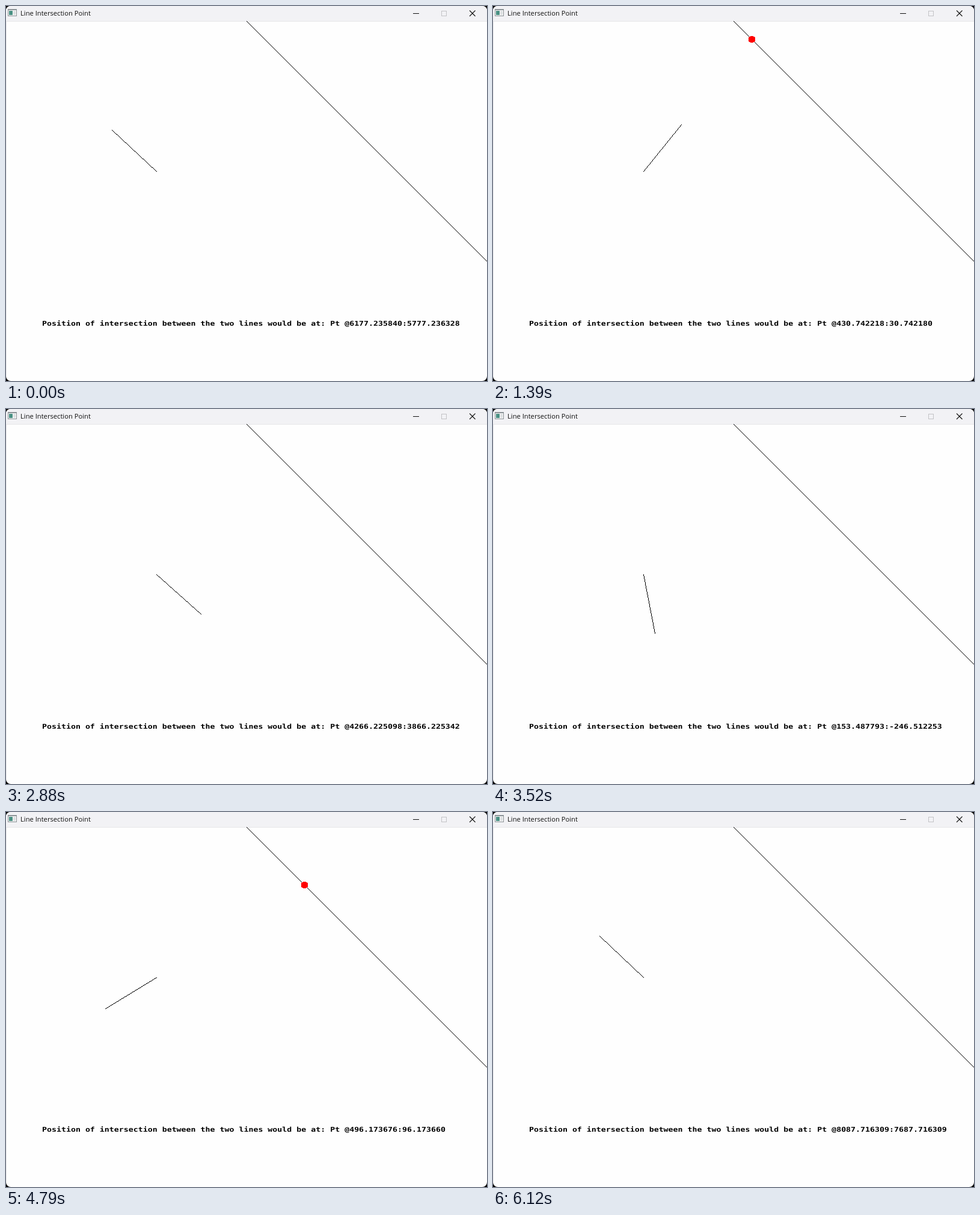
These frames come from a looping animation (800x624 px, 6.21 s). An HTML page with a canvas:

```html
<!DOCTYPE html>
<html lang="en">
<head>
<meta charset="utf-8">
<title>Line Intersection Point</title>
<style>
  html, body { margin: 0; width: 100%; height: 100%; overflow: hidden; background: #000; }
  svg, canvas { position: absolute; left: 0; top: 0; width: 800px; height: 624px; }
  .title { font: 11.2px "Open Sans", "Noto Sans", sans-serif; fill: #111; }
  .report { font: bold 13.288px "DejaVu Sans Mono", "Liberation Mono", monospace; text-rendering: geometricPrecision; }
</style>
</head>
<body>
<svg viewBox="0 0 800 624">
  <rect width="800" height="624" rx="8" fill="#fefefe"/>
  <path d="M0 25V8Q0 0 8 0H792Q800 0 800 8V25Z" fill="#f2f2f5"/>
  <path d="M0 25.5H800M.5 25V616" stroke="#e6e6e9" fill="none"/>
  <g shape-rendering="crispEdges">
    <rect x="3" y="5" width="15" height="12" fill="#8b9296"/>
    <rect x="4" y="7" width="13" height="9" fill="#f8f8f8"/>
    <rect x="5" y="8" width="6" height="7" fill="#4a9184"/>
    <rect x="12" y="8" width="4" height="7" fill="#dde1e2"/>
  </g>
  <text class="title" x="24" y="16">Line Intersection Point</text>
  <path d="M677 12.5H687" stroke="#111"/>
  <rect x="724.5" y="8.5" width="8" height="8" fill="none" stroke="#c3c3c6"/>
  <path d="M771 7.5L780.5 17M780.5 7.5L771 17" stroke="#111" stroke-width="1.1"/>
  <text class="report" id="report" transform="translate(60 532) scale(1 .83)"></text>
</svg>
<canvas id="view" width="800" height="624"></canvas>
<script>
const LOOP = 6210, TICK = 30, TOP = 25, PIVOT = 250, REACH = 100;
// time in ms, angle in degrees, how long the pose holds
const keys = [
  [0, 223], [30, 224.5], [60, 226.5], [610, 261, 60], [1390, 309.5],
  [1910, 342.5], [2060, 353.5], [2880, 402, 60], [2940, 406.5],
  [3120, 417, 90], [3790, 454.5, 60], [4240, 477], [4450, 488.5, 70],
  [5120, 528.5, 60], [5390, 542], [5790, 560, 60], [6120, 583.5, 90]
];
const ctx = document.getElementById('view').getContext('2d');
const report = document.getElementById('report');
const f = Math.fround;

function angleAt(t) {
  let i = keys.length - 1;
  while (keys[i][0] > t) i--;
  const [start, from, hold = TICK] = keys[i];
  const next = keys[i + 1];
  if (!next || t - start < hold) return from;
  const held = Math.floor((t - start) / TICK) * TICK;
  const angle = from + (next[1] - from) * held / (next[0] - start);
  return Math.round(angle * 2) / 2;
}

// Single precision, so the last printed digits carry its rounding
function intersect(ex, ey) {
  const a = f(ey - PIVOT), b = f(PIVOT - ex);
  const c = f(f(a * PIVOT) + f(b * PIVOT));
  const det = f(f(a * -400) - f(400 * b));
  return [
    f(f(f(-400 * c) - f(b * 160000)) / det),
    f(f(f(a * 160000) - f(400 * c)) / det)
  ];
}

function pixelLine(x0, y0, x1, y1) {
  const n = Math.max(Math.abs(x1 - x0), Math.abs(y1 - y0));
  for (let i = 0; i <= n; i++) {
    ctx.fillRect(Math.round(x0 + (x1 - x0) * i / n), TOP + Math.round(y0 + (y1 - y0) * i / n), 1, 1);
  }
}

function dot(x, y) {
  for (let d = -5; d <= 5; d++) {
    const half = Math.round(Math.sqrt(30 - d * d));
    if (y + d >= 0) ctx.fillRect(x - half, TOP + y + d, 2 * half + 1, 1);
  }
}

function draw(t) {
  const rad = angleAt(t) % 360 * Math.PI / 180;
  const ex = f(PIVOT + REACH * Math.cos(rad));
  const ey = f(PIVOT + REACH * Math.sin(rad));
  const [x, y] = intersect(ex, ey);
  ctx.clearRect(0, 0, 800, 624);
  ctx.fillStyle = '#000';
  pixelLine(400, 0, 800, 400);
  pixelLine(PIVOT, PIVOT, Math.trunc(ex), Math.trunc(ey));
  ctx.fillStyle = '#f00';
  dot(Math.trunc(x), Math.trunc(y));
  report.textContent = 'Position of intersection between the two lines would be at: Pt @' +
    x.toFixed(6) + ':' + y.toFixed(6);
}

const begin = performance.now();
function frame() {
  draw((performance.now() - begin) % LOOP);
  requestAnimationFrame(frame);
}
frame();
</script>
</body>
</html>
```
